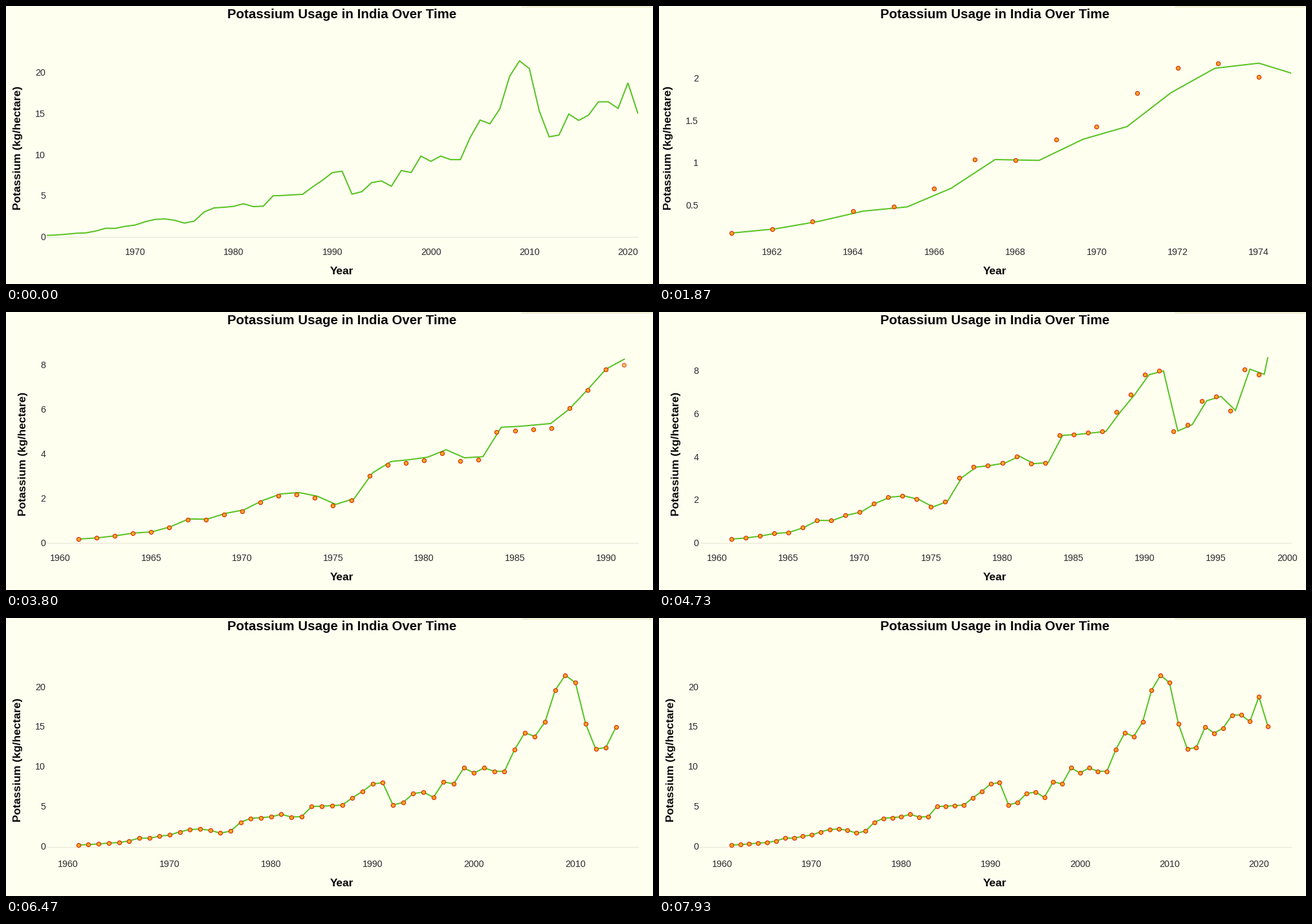
Recreate the animation shown at these times as a matplotlib script. Size 1000 px wide and 431 px high, loop 7990 ms.

```python
import math

import matplotlib.pyplot as plt
import numpy as np
from matplotlib.animation import FuncAnimation
from matplotlib.patches import Rectangle

plt.rcParams["font.family"] = "Liberation Sans"

W, H, DPI = 1000, 431, 64  # a power of two keeps the pixel size exact
LOOP, FRAMES = 7990, 120
LEFT, RIGHT, TOP, BOTTOM = 62, 976, 69.5, 370.2
IVORY, GREEN = "#fffff0", "#58c322"
TICK_PX = 14.2
FADE = 110  # ms for one transition

USAGE = np.array([
    0.17, 0.22, 0.31, 0.43, 0.48, 0.70, 1.04, 1.03, 1.28, 1.43, 1.83, 2.12,
    2.18, 2.02, 1.67, 1.92, 3.03, 3.52, 3.60, 3.71, 4.03, 3.68, 3.73, 5.00,
    5.04, 5.12, 5.18, 6.08, 6.89, 7.82, 8.00, 5.20, 5.50, 6.61, 6.81, 6.16,
    8.08, 7.84, 9.84, 9.20, 9.84, 9.41, 9.41, 12.13, 14.23, 13.78, 15.60,
    19.57, 21.45, 20.50, 15.36, 12.19, 12.40, 14.97, 14.19, 14.83, 16.45,
    16.46, 15.65, 18.76, 15.07])
YEARS = 1961 + np.arange(len(USAGE))
COUNT = len(USAGE)

# moment at which the n-th year is added
STARTS = np.interp(np.arange(1, COUNT + 1),
                   [1, 2, 15, 24, 31, 39, 54, 61],
                   [200, 340, 1860, 2915, 3732, 4667, 6355, 7215])


def pt(px):
    return px * 72 / DPI


def padded(lo, hi, length, pad):
    """Range that keeps pad pixels free at both ends."""
    if lo == hi:
        return lo - 1, hi + 1
    extra = (hi - lo) * pad / (length - 2 * pad)
    return lo - extra, hi + extra


class Scale:
    """Axis ranges fitted to the first n years; n = 0 fits the bare full line."""

    def __init__(self, n):
        w, h = RIGHT - LEFT, BOTTOM - TOP
        m = n or COUNT
        grow = 3.6 if n else 0
        xpad = 0.05 * w + grow if n else 0
        self.x = padded(YEARS[0], YEARS[m - 1], w, xpad)
        self.y = padded(USAGE[:m].min(), USAGE[:m].max(), h, 0.05 * h + grow)

    def px(self, v):
        a, b = self.x
        return LEFT + (v - a) / (b - a) * (RIGHT - LEFT)

    def py(self, v):
        a, b = self.y
        return BOTTOM - (v - a) / (b - a) * (BOTTOM - TOP)

    def points(self, n):
        return np.column_stack([self.px(YEARS[:n]), self.py(USAGE[:n])])


def ticks(lo, hi, length, min_px):
    rough = (hi - lo) / (min(max(length / min_px, 4), 9) + 1)
    base = 10 ** math.floor(math.log10(rough))
    step = next(k * base for k in (2, 5, 10) if rough <= k * base)
    first = math.ceil(lo / step - 1e-6)
    last = math.floor(hi / step + 1e-6)
    return [round(k * step, 6) for k in range(first, last + 1)]


def simplify(pts, tol=0.76):
    """Merge runs of points that lie nearly on one straight line."""
    out, i = [pts[0]], 1
    while i < len(pts):
        start, end = out[-1], pts[i]
        ux, uy = (end - start) / np.hypot(*(end - start))
        low = high = 0
        i += 1
        while i < len(pts):
            dx, dy = pts[i] - start
            dev = dx * uy - dy * ux
            low, high = min(low, dev), max(high, dev)
            if high - low > tol:
                break
            end = pts[i]
            i += 1
        out.append(end)
        if i < len(pts):
            out.append(pts[i])
            i += 1
    return np.array(out)


def ease(u):
    return 4 * u ** 3 if u < 0.5 else 1 - (2 - 2 * u) ** 3 / 2


def label(v):
    return f"{v:.8g}".replace("-", "\u2212")


def text_width(s):
    em = {".": 0.278, "\u2212": 0.584}
    return TICK_PX * sum(em.get(c, 0.556) for c in s)


SCALES = [Scale(n) for n in range(COUNT)]
PATHS = [simplify(SCALES[n - 1].points(n)) for n in range(1, COUNT + 1)]

fig = plt.figure(figsize=(W / DPI, H / DPI), dpi=DPI, facecolor=IVORY)
ax = fig.add_axes([0, 0, 1, 1])
ax.set_xlim(-0.5, W - 0.5)
ax.set_ylim(H - 0.5, -0.5)
ax.axis("off")


def write(x, y, s, px, **kw):
    return ax.text(x, y, s, fontsize=pt(px), va="baseline", **kw)


bold = dict(ha="center", weight="bold", color="#080808")
write(519, 18, "Potassium Usage in India Over Time", 20.5, **bold)
write(519, 415.7, "Year", 17.4, **bold)
y_title = write(22.5, 219.7, "Potassium (kg/hectare)", 17.4, rotation=90,
                rotation_mode="anchor", **bold)
x_labels = [write(0, 385.5, "", TICK_PX, ha="center", color="#2b2b2b")
            for _ in range(14)]
y_labels = [write(60.5, 0, "", TICK_PX, ha="right", color="#2b2b2b")
            for _ in range(14)]

ax.plot([796, W], [0, 0], color="#dedeb4", lw=pt(1))
zero, = ax.plot([LEFT, RIGHT], [0, 0], color="#e3e6d0", lw=pt(1))
line, = ax.plot([], [], color=GREEN, lw=pt(2), solid_joinstyle="miter")
dot = dict(ls="", marker="o", ms=pt(6.2), mfc="#ffa820", mec="#d42a08",
           mew=pt(1.15))
dots, = ax.plot([], [], **dot)
newest, = ax.plot([], [], **dot)

window = Rectangle((LEFT, TOP), RIGHT - LEFT, BOTTOM - TOP,
                   transform=ax.transData)
for part in (line, dots, newest):
    part.set_clip_path(window)


def show_axes(s):
    xs = ticks(*s.x, RIGHT - LEFT, 80)
    ys = ticks(*s.y, BOTTOM - TOP, 40)
    for i, t in enumerate(x_labels):
        t.set_visible(i < len(xs))
        if i < len(xs):
            t.set_text(label(xs[i]))
            t.set_x(s.px(xs[i]))
    for i, t in enumerate(y_labels):
        t.set_visible(i < len(ys))
        if i < len(ys):
            t.set_text(label(ys[i]))
            t.set_y(s.py(ys[i]) + 5)
    widest = max(text_width(label(v)) for v in ys)
    y_title.set_x(38.3 - widest)
    zero.set_visible(s.y[0] < 0 < s.y[1])
    zero.set_ydata([round(s.py(0))] * 2)


def draw(k):
    now = k * LOOP / FRAMES
    n = int(np.searchsorted(STARTS, now, side="right"))
    scale = SCALES[max(n - 1, 0)]
    show_axes(scale)
    if n == 0:
        line.set_data(*scale.points(COUNT).T)
        dots.set_data([], [])
        newest.set_data([], [])
        return

    u = ease(min((now - STARTS[n - 1]) / FADE, 1))
    path = PATHS[n - 1].copy()
    if n > 1:
        # vertices pair up by index; surplus ones stand at their new place
        old = PATHS[n - 2]
        m = min(len(old), len(path))
        path[:m] = old[:m] + u * (path[:m] - old[:m])
    line.set_data(*path.T)

    pts = scale.points(n)
    dots.set_data(*pts[:-1].T)
    newest.set_data(*pts[-1:].T)
    newest.set_alpha(u)


anim = FuncAnimation(fig, draw, frames=FRAMES, interval=LOOP / FRAMES,
                     init_func=lambda: draw(0), repeat=True, repeat_delay=0)
plt.show()
```
